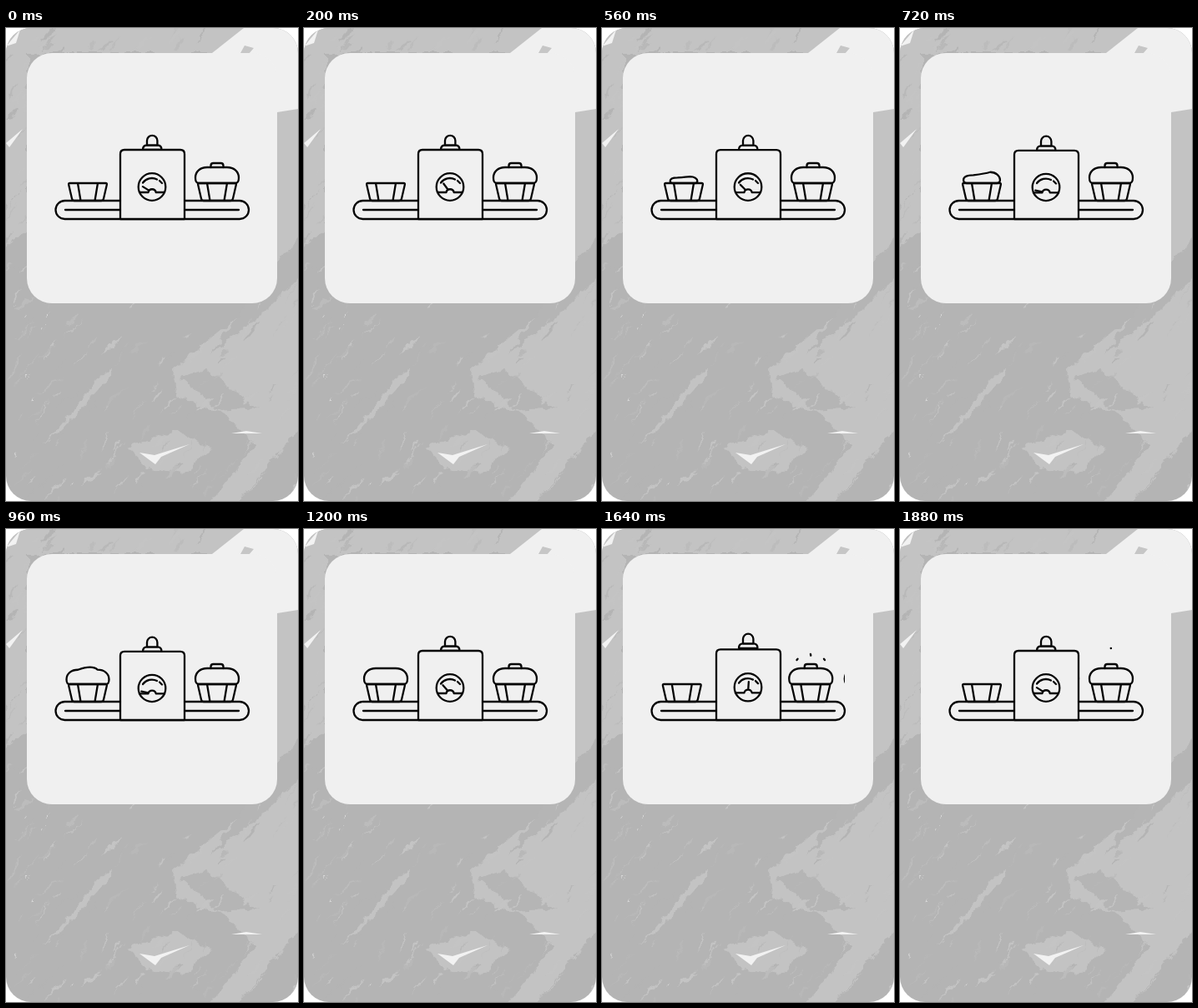
Recreate the animation shown at these times as an HTML page. Size 350 by 567 pixels, loop 1920 ms.

```html
<!DOCTYPE html>
<html lang="en">
<head>
<meta charset="utf-8">
<title>Cupcake machine</title>
<style>
html, body { margin: 0; width: 100%; height: 100%; overflow: hidden; background: #fff; }
svg { position: absolute; left: 0; top: 0; width: 350px; height: 567px; }
#foil { border-radius: 30px; overflow: hidden; background: #b4b4b4; will-change: transform; }
#scene { fill: none; stroke: #050505; stroke-width: 2.3; stroke-linecap: round; stroke-linejoin: round; }
.solid { fill: #f0f0f0; }
</style>
</head>
<body>
<svg id="foil" viewBox="0 0 350 567">
  <filter id="crumple" x="-10%" y="-10%" width="120%" height="120%" color-interpolation-filters="sRGB">
    <feTurbulence type="fractalNoise" baseFrequency=".08" numOctaves="3" seed="8"/>
    <feDisplacementMap in="SourceGraphic" scale="11" xChannelSelector="R" yChannelSelector="G"/>
  </filter>
  <g filter="url(#crumple)">
    <path fill="#c3c3c3" d="M-20-20H370V455L270 580H235L300 500 262 462 205 440 200 410 322 310V30H26V240L-20 280Z"/>
    <path fill="#b5b5b5" d="M370 230V280L300 350 245 390 322 285ZM208 418 240 410 302 455 255 458Z"/>
    <path fill="#c3c3c3" d="M45 500 118 412 130 410 78 470ZM145 502 205 482 245 505 212 535 170 528Z"/>
    <g id="creases"></g>
  </g>
  <path fill="#f0f0f0" d="M247 30 285 0H350V97L325 101 300 60Z"/>
  <path fill="#c6c6c6" d="M281 30 286 21 297 24 291 31Z"/>
  <path fill="#f2f2f2" d="M0 138 20 121 4 143ZM0 22 17 2 12 18ZM160 509 178 512 220 499 186 514 179 523ZM270 486 288 483 307 486Z"/>
  <rect x="25" y="30" width="300" height="300" rx="30" fill="#f0f0f0"/>
</svg>

<svg id="scene" viewBox="0 0 350 567">
  <defs>
    <clipPath id="span"><rect x="59" y="100" width="232" height="140"/></clipPath>
    <path id="cup" d="M-21.500 186H21.500Q23.300 186 22.800 188L19 204.500Q18.400 207 16 207H-16Q-18.400 207-19 204.500L-22.800 188Q-23.300 186-21.500 186ZM-12 186-8.500 207M12 186 8.500 207"/>
    <g id="cake">
      <use href="#cup"/>
      <path id="top"/>
      <path d="M-7.500 167V165Q-7.500 162-4.500 162H4.500Q7.500 162 7.500 165V167"/>
    </g>
  </defs>
  <g clip-path="url(#span)">
    <use id="empty" href="#cup"/>
    <g id="filled"><use href="#cup"/><path id="dough"/></g>
    <use id="fresh" href="#cake"/>
    <use id="done" href="#cake"/>
    <path id="sparks"/>
  </g>
  <rect x="59.500" y="207" width="231.500" height="22" rx="11"/>
  <path d="M71 218H279"/>
  <g id="lamp" class="solid">
    <path d="M164 146Q164 140.500 169 140.500H181.500Q186.500 140.500 186.500 146Z"/>
    <path d="M169 140.500V135A6.200 6.200 0 0 1 181.400 135V140.500Z"/>
  </g>
  <g id="box">
    <path class="solid" d="M137 229V151Q137 146 142 146H209Q214 146 214 151V229Z"/>
    <circle cx="175" cy="190.500" r="16.300"/>
    <path d="M164 185.500A13.500 13.500 0 0 1 181 181.500M184 183 187 186M160 197H170.500A4.700 4.700 0 0 1 179.700 197H190"/>
    <path id="needle" d="M175 192V184"/>
  </g>
</svg>

<script>
const $ = id => document.getElementById(id);
const LOOP = 1920, STEP = 40;
const clamp = v => Math.max(0, Math.min(1, v));
const smooth = v => v * v * (3 - 2 * v);
const mix = (a, b, k) => a + (b - a) * k;
const progress = (t, from, to) => clamp((t - from) / (to - from));
// Soft pulse that peaks at time c and fades out within w on both sides
const bump = (t, c, w) => smooth(clamp(1 - Math.abs(t - c) / w));
const move = (id, value) => $(id).setAttribute('transform', value);
const shape = (id, d) => $(id).setAttribute('d', d);

// Cake top: half width, height, rise of the right side, bulge in the middle
function dome(w, h, lean = 0, peak = 0) {
  const top = 186 - h, side = 186 - h * .34;
  const edge = w * .83, flat = w * .46, mid = side - h * .4;
  return `M${-edge} 186C${-w * .96} 186 ${-w} ${186 - h * .1} ${-w} ${side}
    C${-w} ${mid} ${-w * .77} ${top + lean} ${-flat} ${top + lean}
    Q${w * .2} ${top - peak} ${flat} ${top - lean}
    C${w * .77} ${top - lean} ${w} ${mid} ${w} ${side}
    C${w} ${186 - h * .1} ${w * .96} 186 ${edge} 186Z`;
}

function rising(t) {
  const g = progress(t, 310, 1200);
  if (!g) return '';
  const s = smooth(clamp(g * 1.08)), drop = 4 * clamp(g * 20);
  return dome(26 * (1 - (1 - g) ** 3), mix(drop, 19, s), 1.8 * bump(t, 720, 260), 6 * bump(t, 960, 240));
}

function sparkPath(t, x) {
  if (t < 1460 || t > 1900) return '';
  const up = progress(t, 1480, 1880), side = progress(t, 1480, 1800), k = 1 - side;
  let d = `M${x} ${mix(157.5, 143, up)}l-.3 ${-3 * (1 - up)}`;
  if (k) for (const s of [-1, 1]) d += `M${x + s * mix(11.500, 20, side)} ${mix(158.500, 153, side)}l${s * 2 * k} ${2.500 * k}`;
  return d;
}

function draw(t) {
  const p = smooth(progress(t, 1205, 1695)), fresh = mix(175, 253, p);
  move('empty', `translate(${mix(34, 98, p)} 0)`);
  move('filled', `translate(${mix(98, 188, p)} 0)`);
  move('fresh', `translate(${fresh} 0)`);
  move('done', `translate(${253 + 42 * p + 25 * p * p} 0)`);
  shape('dough', rising(t));
  shape('sparks', sparkPath(t, fresh));

  const squash = bump(t, 840, 340), jump = bump(t, 1480, 280);
  const scale = 1 - .015 * squash + .049 * jump, lift = 83 * (1 - scale);
  move('box', `translate(0 ${229 * (1 - scale)}) scale(1 ${scale})`);
  move('lamp', `translate(0 ${lift - 4 * jump})`);
  const angle = -58 + 43 * bump(t, 360, 320) - 30 * bump(t, 840, 300) + 100 * bump(t, 1480, 380);
  move('needle', `rotate(${angle} 175 197)`);
}

// Seeded shards that run along the diagonal folds of the foil
let seed = 41;
const rand = (a, b) => a + (b - a) * (seed = seed * 16807 % 2147483647) / 2147483647;
const tones = ['#bcbcbc', '#c4c4c4', '#b4b4b4', '#c4c4c4', '#b8b8b8'];
let shards = '';
function shard(x, y, len, w, fill) {
  const a = -rand(.55, 1.15), dx = len * Math.cos(a), dy = len * Math.sin(a);
  shards += `<path fill="${fill}" d="M${x} ${y}l${dx * .6} ${dy * .6 - w} ${dx * .4} ${dy * .4 + w} ${-dx * .6} ${-dy * .6 + w}Z"/>`;
}
for (let i = 0; i < 110; i++) shard(rand(0, 350), rand(330, 570), rand(8, 42), rand(.5, 4), tones[i % 5]);
for (let i = 0; i < 24; i++) shard(rand(-10, 20), rand(20, 330), rand(10, 30), rand(1, 4), tones[i % 5]);
for (let i = 0; i < 16; i++) shard(rand(20, 250), rand(10, 34), rand(10, 30), rand(1, 5), tones[i % 5]);
for (let i = 0; i < 10; i++) shard(rand(0, 110), rand(335, 560), rand(3, 8), .6, '#e4e4e4');
$('creases').innerHTML = shards;
shape('top', dome(26, 19));

function frame() {
  draw(Math.floor(performance.now() % LOOP / STEP) * STEP);
  requestAnimationFrame(frame);
}
frame();
</script>
</body>
</html>
```
